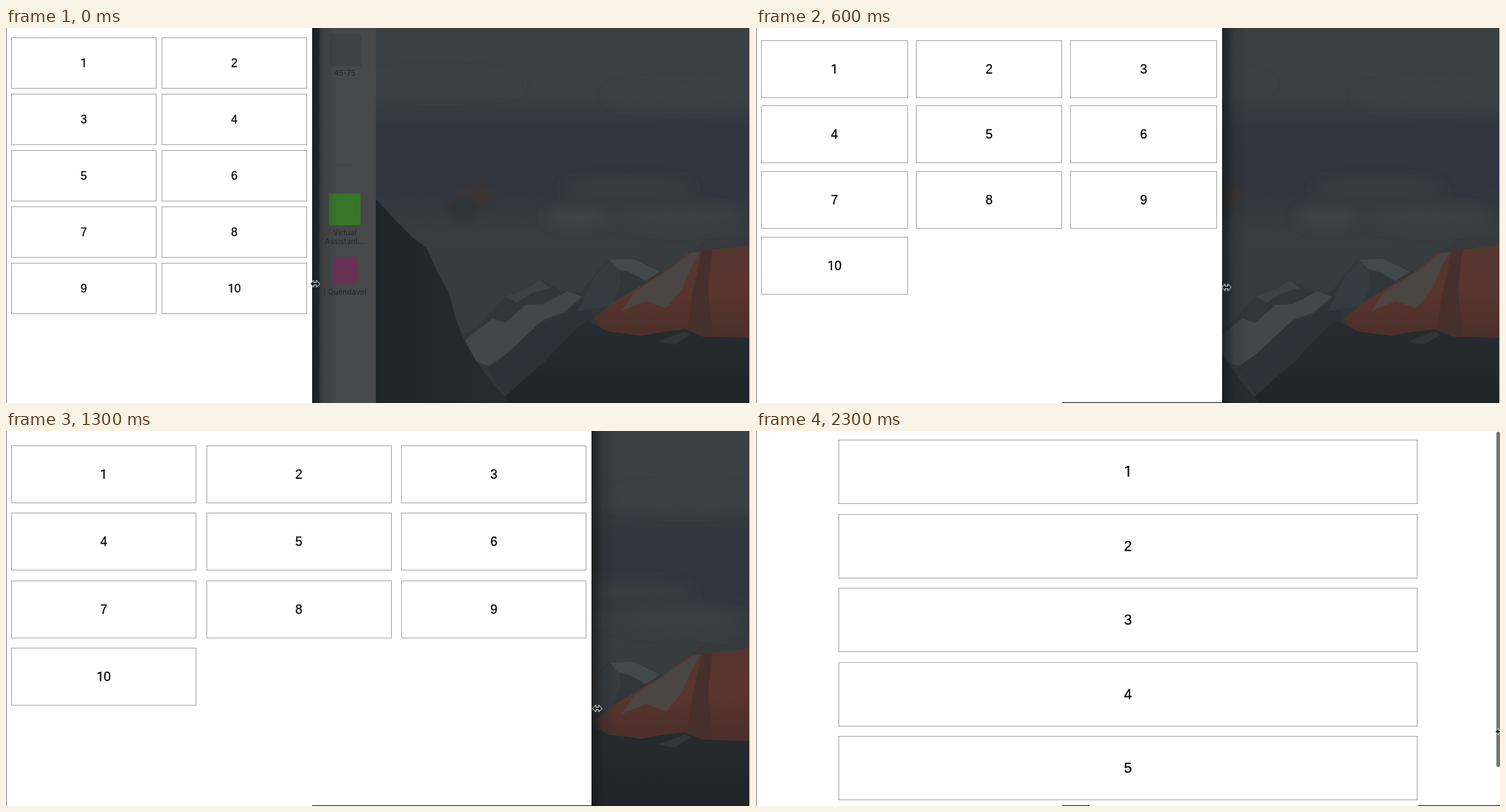
Recreate the animation shown at these times as an HTML page. Size 1028 px wide and 519 px high, loop 2.4 s.

```html
<!DOCTYPE html>
<html lang="en">
<head>
<meta charset="utf-8">
<title>Responsive grid</title>
<style>
  html, body { margin: 0; width: 100%; height: 100%; overflow: hidden; background: #34393d; }
  .stage { position: relative; width: 1028px; height: 519px; overflow: hidden; }
  .desk { position: absolute; inset: 0; font: 10.5px Inter, "Open Sans", sans-serif; }

  .panel, .cursor, .bar { animation: 2400ms -2ms infinite; }

  .panel {
    position: absolute; top: 0; left: 0; height: 519px;
    container-type: inline-size;
    background: #fff;
    animation-name: resize;
  }
  .panel::before {
    content: ""; position: absolute; z-index: 1; left: 0; width: 1px; height: 100%;
    background: #8c8c8c;
  }
  .panel::after {
    content: ""; position: absolute; left: 100%; width: 36px; height: 100%;
    background: linear-gradient(90deg, #14181bb0, #1a1e2180 25%, #1f242738 45%, #1f242700);
  }
  .clip { position: absolute; inset: 0; overflow: hidden; }

  .grid {
    --gap: calc((100cqw - 14px) * .017);
    --h: 71px;
    display: grid;
    grid-template-columns: 1fr 1fr;
    gap: var(--gap);
    padding: calc(6px + var(--gap)) 7px 0;
    font: 16px "Liberation Sans", Arial, sans-serif;
    color: #000;
    -webkit-text-stroke: .25px #000;
  }
  .box {
    box-sizing: border-box; height: var(--h); line-height: calc(var(--h) - 2px);
    border: 1px solid #a8a8a8; text-align: center;
  }
  /* a "1" without a foot */
  .box:nth-child(9n+1)::first-letter { font-family: Roboto, sans-serif; }

  .seam {
    position: absolute; top: 518px; left: 423px; right: 0; height: 1px;
    background: #1d2022;
  }
  .bar {
    display: none;
    position: absolute; top: 0; right: 0; height: 100%; width: 5px;
    box-sizing: border-box;
    animation-name: widen; animation-timing-function: step-end;
  }
  .thumb {
    position: absolute; top: 1px; right: 0; height: 464px; width: 100%;
    border-radius: 5px; background: #747474;
  }

  @container (min-width: 427px) {
    .grid { --h: 80px; grid-template-columns: repeat(3, 1fr); font-size: 17.5px; }
  }
  @container (min-width: 910px) {
    .grid {
      --h: 89px; --gap: 13.5px;
      grid-template-columns: 800px; justify-content: center;
      padding-top: 12.4px; font-size: 19.5px;
    }
    .seam { background: linear-gradient(90deg, #1d2022 38px, #fff 38px 492px, #1d2022 492px); }
    .bar { display: block; }
  }

  .edge { position: absolute; top: 0; left: 1027px; width: 1px; height: 100%; background: #d8d8d8; }
  .cursor { position: absolute; left: -10px; top: -8px; width: 20px; height: 16px; animation-name: drag; }

  @keyframes resize {
    0%       { width: 423px;  animation-timing-function: steps(2); }
    8.333%   { width: 484px;  animation-timing-function: steps(2); }
    16.666%  { width: 558px;  animation-timing-function: steps(2); }
    25%      { width: 644px;  animation-timing-function: steps(3); }
    37.5%    { width: 709px;  animation-timing-function: steps(3); }
    50%      { width: 783px;  animation-timing-function: steps(1); }
    54.166%  { width: 809px;  animation-timing-function: steps(3); }
    66.666%  { width: 915px;  animation-timing-function: steps(2); }
    75%      { width: 965px;  animation-timing-function: steps(2); }
    83.333%  { width: 1001px; animation-timing-function: steps(3); }
    95.833%, 100% { width: 1028px; }
  }
  @keyframes drag {
    0%       { transform: translate(427px, 354px);  animation-timing-function: steps(2); }
    8.333%   { transform: translate(491px, 354px);  animation-timing-function: steps(2); }
    16.666%  { transform: translate(568px, 354px);  animation-timing-function: steps(2); }
    25%      { transform: translate(650px, 359px);  animation-timing-function: steps(3); }
    37.5%    { transform: translate(714px, 371px);  animation-timing-function: steps(3); }
    50%      { transform: translate(789px, 380px);  animation-timing-function: steps(1); }
    54.166%  { transform: translate(817px, 384px);  animation-timing-function: steps(3); }
    66.666%  { transform: translate(924px, 404px);  animation-timing-function: steps(2); }
    75%      { transform: translate(981px, 414px);  animation-timing-function: steps(2); }
    83.333%  { transform: translate(1010px, 415px); animation-timing-function: steps(3); }
    95.833%, 100% { transform: translate(1028px, 416px); }
  }
  @keyframes widen {
    0% { width: 5px; padding: 0; border-left: 0; background: none; }
    91.666%, 100% { width: 14px; border-left: 1px solid #e6e6e6; background: #fafafa; }
  }
  @keyframes thicken {
    0% { width: 100%; right: 0; }
    91.666%, 100% { width: 10px; right: 1px; }
  }
  .thumb { animation: thicken 2400ms -2ms step-end infinite; }
</style>
</head>
<body>
<div class="stage">
  <svg class="desk" viewBox="0 0 1028 519" width="1028" height="519">
    <defs>
      <linearGradient id="sky" x1="0" y1="0" x2="0" y2="1">
        <stop offset="0" stop-color="#3b4043"/>
        <stop offset=".18" stop-color="#3a3f43"/>
        <stop offset=".27" stop-color="#33363e"/>
        <stop offset=".42" stop-color="#32353e"/>
        <stop offset=".55" stop-color="#373d40"/>
        <stop offset=".72" stop-color="#363b3f"/>
      </linearGradient>
      <linearGradient id="rock" x1="0" y1="0" x2="0" y2="1">
        <stop offset="0" stop-color="#533630"/>
        <stop offset=".5" stop-color="#5a352d"/>
        <stop offset="1" stop-color="#4a2f2a"/>
      </linearGradient>
      <linearGradient id="wood" x1="0" y1="0" x2="0" y2="1">
        <stop offset="0" stop-color="#262c2f"/>
        <stop offset="1" stop-color="#1f2427"/>
      </linearGradient>
      <linearGradient id="wall" x1="0" y1="0" x2="1" y2="0">
        <stop offset="0" stop-color="#1e2326"/>
        <stop offset="1" stop-color="#272d31"/>
      </linearGradient>
      <filter id="soft" x="-50%" y="-50%" width="200%" height="200%"><feGaussianBlur stdDeviation="9"/></filter>
      <filter id="haze" x="-50%" y="-50%" width="200%" height="200%"><feGaussianBlur stdDeviation="3"/></filter>
    </defs>
    <rect width="1028" height="519" fill="url(#sky)"/>
    <g filter="url(#soft)">
      <ellipse cx="600" cy="78" rx="110" ry="14" fill="#3c4144"/>
      <ellipse cx="940" cy="95" rx="110" ry="16" fill="#3b4044"/>
      <ellipse cx="860" cy="222" rx="90" ry="14" fill="#383c41"/>
      <ellipse cx="790" cy="262" rx="45" ry="12" fill="#404548"/>
      <ellipse cx="930" cy="262" rx="90" ry="16" fill="#3a3f43"/>
    </g>
    <g filter="url(#haze)">
      <ellipse cx="650" cy="232" rx="26" ry="15" fill="#3b3636"/>
      <ellipse cx="632" cy="250" rx="23" ry="16" fill="#2f3638"/>
    </g>

    <path fill="#30363a" d="M600 440 650 415 690 372 715 362 738 348 768 364 793 366 812 344 830 322 865 318 910 338 940 519H600Z"/>
    <path fill="#41474b" d="M634 432 672 402 690 408 718 383 742 382 776 364 796 372 770 394 742 404 716 428 690 452 668 468 650 462Z"/>
    <path fill="#3c4246" d="M690 372 716 362 738 349 752 360 728 366 706 380Z"/>
    <path fill="#2b3238" d="M664 470 700 446 735 410 770 398 800 372 812 400 770 440 720 500 690 508Z"/>
    <path fill="#343c42" d="M790 392 812 346 832 322 846 330 850 352 838 384Z"/>
    <path fill="#42494d" d="M834 321 866 319 904 337 884 350 862 338 846 334Z"/>
    <path fill="url(#rock)" d="M812 402 842 378 878 356 912 336 942 310 962 300 978 296 1004 292 1014 296 1028 288V432L940 432 830 424Z"/>
    <path fill="#4b4543" d="M868 366 914 336 946 312 962 304 946 334 934 362 912 388 884 378 850 392Z"/>
    <path fill="#363a3d" d="M942 311 972 291 992 295 1012 288 1028 287V300L1004 304 980 306 962 310Z"/>
    <path fill="#47302b" d="M962 306 976 308 970 360 976 425 940 425 948 370Z"/>
    <path fill="url(#wood)" d="M680 519 716 486 744 462 768 436 792 412 806 406 832 420 878 426 910 420 938 417 962 427 1028 429V519Z"/>
    <path fill="#30373a" d="M900 434 938 420 946 424 924 438Z"/>
    <path fill="url(#wall)" d="M500 232 514 240 540 268 560 288 582 306 597 340 612 366 620 398 632 430 648 458 668 486 696 519H500Z"/>

    <g text-anchor="middle" fill="#232628">
      <rect x="423" width="10" height="519" fill="#2a2e31"/>
      <rect x="433" width="78" height="519" fill="#464849"/>
      <rect x="447" y="8" width="44" height="45" rx="3" fill="#3e4245"/>
      <text x="468" y="66">45-75</text>
      <rect x="456" y="189" width="24" height="2" fill="#414344"/>
      <rect x="446" y="229" width="44" height="44" fill="#387528"/>
      <text x="468" y="287">Virtual</text>
      <text x="468" y="299">Assistant...</text>
      <rect x="453" y="317" width="33" height="37" fill="#693155"/>
      <text x="468" y="369">| Quendavel</text>
    </g>
  </svg>

  <div class="edge"></div>

  <div class="panel">
    <div class="clip">
      <div class="grid">
        <div class="box">1</div><div class="box">2</div>
        <div class="box">3</div><div class="box">4</div>
        <div class="box">5</div><div class="box">6</div>
        <div class="box">7</div><div class="box">8</div>
        <div class="box">9</div><div class="box">10</div>
      </div>
      <div class="seam"></div>
      <div class="bar"><div class="thumb"></div></div>
    </div>
  </div>

  <svg class="cursor" viewBox="-10 -8 20 16">
    <path d="M-6.5 0-2-4.8V-1.8H2V-4.8L6.5 0 2 4.8V1.8H-2V4.8Z" fill="#1b1b1b" stroke="#e4e4e4"/>
  </svg>
</div>
</body>
</html>
```
